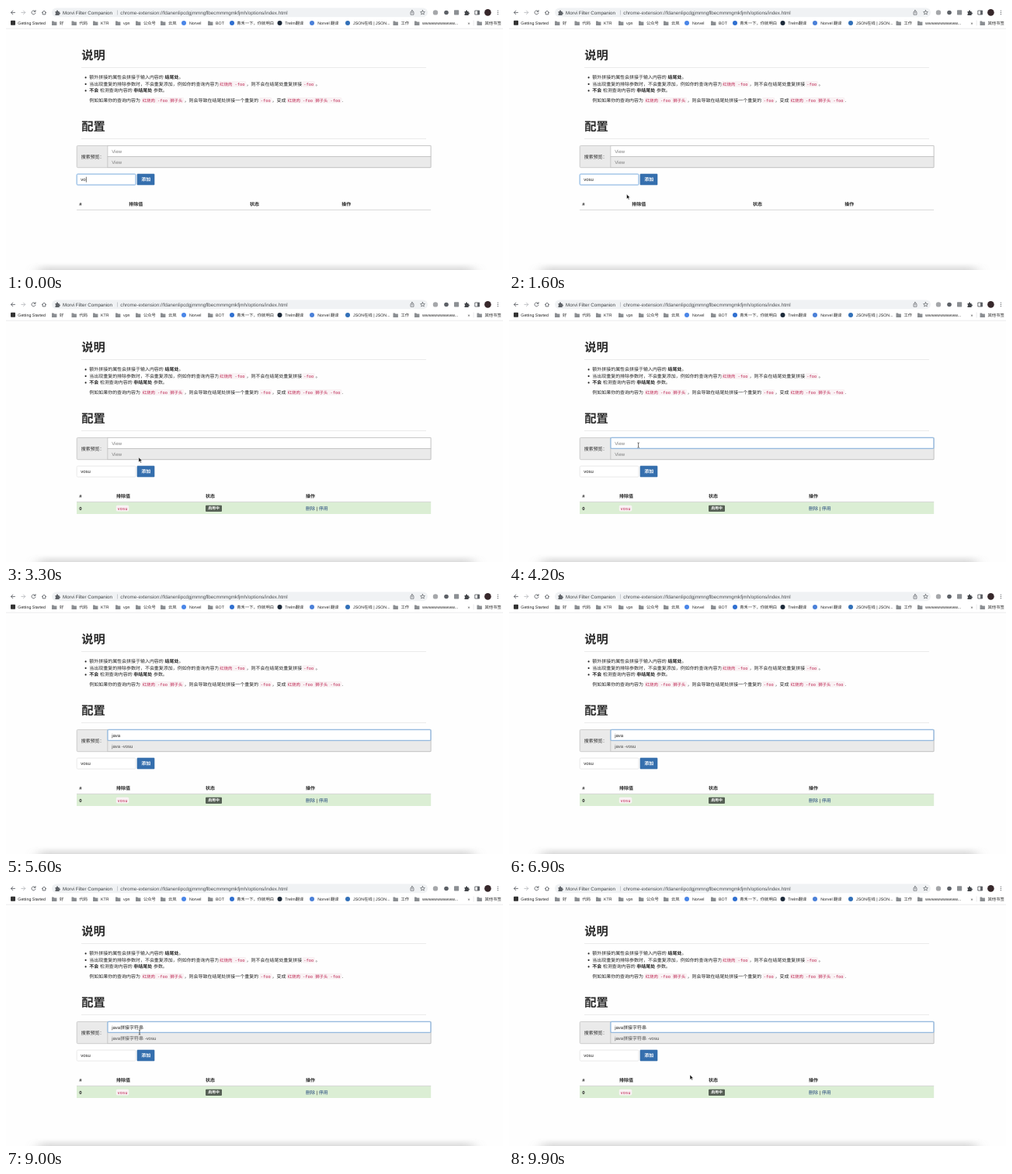
Recreate the animation shown at these times as an HTML page. Size 640 px wide and 341 px high, loop 10 s.

```html
<!DOCTYPE html>
<html lang="zh-CN">
<head>
<meta charset="utf-8">
<title>Options</title>
<style>
html, body { margin: 0; width: 100%; height: 100%; overflow: hidden; background: #fff; }
svg { display: block; width: 640px; height: 341px; }
text { font-family: "Liberation Sans", "Noto Sans CJK SC", "Noto Sans CJK", sans-serif; font-size: 5.97px; font-weight: 500; fill: #222; white-space: pre; text-rendering: geometricPrecision; }
.b { font-weight: 700; }
.h { font-size: 15.3px; font-weight: 700; fill: #2b2b2b; }
.code { font-family: "DejaVu Sans Mono", "Noto Sans CJK SC", monospace; font-size: 5.38px; fill: #bd2450; }
.mark { font-size: 5.3px; }
.url { font-size: 6.3px; fill: #4a4d51; }
.tag { font-size: 4.9px; font-weight: 700; fill: #fff; }
.link { fill: #24487c; }
.line { fill: none; stroke: #5f6368; stroke-width: .9; stroke-linecap: round; stroke-linejoin: round; }
</style>
</head>
<body>
<svg id="stage" viewBox="0 0 640 341"></svg>
<script>
const LOOP = 10000, STEP = 100;
const WORD = "vosu";
const stage = document.getElementById("stage");

// text with its vertical centre at cy
const text = (x, cy, s, cls = "", extra = "") =>
  `<text x="${x}" y="${cy + 2.1}" class="${cls}" ${extra}>${s}</text>`;
const rect = (x, y, w, h, fill, extra = "") =>
  `<rect x="${x}" y="${y}" width="${w}" height="${h}" fill="${fill}" ${extra}/>`;
const disc = (x, y, r, fill) => `<circle cx="${x}" cy="${y}" r="${r}" fill="${fill}"/>`;
const line = (d, extra = "") => `<path class="line" d="${d}" ${extra}/>`;
const bold = s => `<tspan class="b">${s}</tspan>`;
const code = (x, cy, w, s) =>
  rect(x, cy - 3.8, w, 7.6, "#f9f2f4", 'rx="1.6"') + text(x + 1.7, cy - .2, s, "code");
const folder = x =>
  `<path d="M${x} 19.4h2.3l.9 1h3.2v4.5h-6.4z" fill="#8b8e92"/>`;
const puzzle = (x, y, c) =>
  `<path d="M${x - 2.5} ${y - 1.7}h1.6a1 1 0 1 1 1.9 0h1.6v1.6a1 1 0 1 1 0 1.9v1.5h-5.1v-1.6a1 1 0 0 0 0-1.8z" fill="${c}"/>`;
const group = (id, s) => `<g id="${id}">${s}</g>`;

function toolbar() {
  let s = rect(0, 0, 640, 29, "#fff") + rect(59, 2.6, 484, 11.6, "#f0f2f4", 'rx="5.8"');
  s += line("M11.5 8.4H6.6M8.8 6.1L6.5 8.4L8.8 10.7");
  s += line("M19.8 8.4H24.7M22.5 6.1L24.8 8.4L22.5 10.7", 'style="stroke:#b9bcc0"');
  s += line("M37.6 7A2.5 2.5 0 1 0 37.9 9.2M38 5.6V7.3H36.2");
  s += line("M46.4 8.6L49 6.1L51.6 8.6M47.2 8.2V10.9H50.8V8.2");
  s += puzzle(66, 8.6, "#5f6368");
  s += text(73, 8.4, "Morvi Filter Companion", "url", 'style="font-size:6.2px;fill:#3c4043"');
  s += rect(143.3, 5.5, .5, 6, "#9aa0a6");
  s += text(147.3, 8.4, "chrome-extension://fdanenlipcdgjmmngflbecmmmgmkfjmh/options/index.html", "url");
  s += line("M521.8 7.6H521V11.2H525V7.6H524.2M523 9.2V5.4M521.9 6.4L523 5.3L524.1 6.4", 'style="stroke-width:.7"');
  s += line("M536.5 5.5L537.3 7.4L539.4 7.6L537.8 9L538.3 11L536.5 9.9L534.7 11L535.2 9L533.6 7.6L535.7 7.4Z", 'style="stroke-width:.7"');
  s += disc(553, 8.4, 3.2, "#a5a7aa") + disc(567, 8.5, 2.8, "#5c6066");
  s += rect(577, 5.3, 6.2, 6.2, "#8c9094", 'rx=".7"');
  s += puzzle(593, 8.6, "#44474b");
  s += line("M604.2 6H609.6V11H604.2Z") + rect(607, 6, 2.6, 5, "#5f6368");
  s += disc(620.4, 8.4, 4.3, "#37282b");
  for (const y of [6.1, 8.4, 10.7]) s += disc(633.4, y, .65, "#5f6368");
  return s;
}

function bookmarks() {
  let s = rect(6, 18.8, 6, 6, "#333", 'rx=".8"') + text(15.3, 21.9, "Getting Started", "mark");
  const dirs = [[59, "好"], [84.5, "代码"], [112, "KTR"], [141, "vpn"], [167, "公众号"],
    [199, "云岚"], [260, "BOT"], [498.5, "工作"], [526, "wwwwwwwwwww..."], [606.5, "其他书签"]];
  for (const [x, name] of dirs) s += folder(x) + text(x + 10, 21.9, name, "mark");
  const sites = [[229, "#4a86e8", "Norvel", 236], [291, "#2f6fd0", "青禾一下，你就明白", 297.3],
    [352.5, "#1d2a3a", "Trelm翻译", 359.3], [394, "#4a80d8", "Norvel 翻译", 401.3],
    [440, "#3270b8", "JSON在线 | JSON...", 447]];
  for (const [x, c, name, tx] of sites) s += disc(x, 21.9, 3, c) + text(tx, 21.9, name, "mark");
  s += text(594.5, 21.6, "»", "mark") + rect(601.8, 18.5, .5, 7, "#d5d7da");
  return s + rect(0, 28.8, 640, .6, "#dcdddf");
}

function page() {
  const edge = 'stroke="#bcbcbc" stroke-width=".7"';
  let s = text(97.2, 66.9, "说明", "h") + rect(97, 79.3, 444, .6, "#e0e0e0");
  for (const y of [92.4, 100.9, 109.4]) s += disc(102.6, y, 1.05, "#222");
  s += text(107.3, 92.2, "额外拼接的属性会拼接于输入内容的 " + bold("结尾处") + "。");
  s += text(107.3, 100.7, "当出现重复的排除参数时，不会重复添加，例如你的查询内容为");
  s += code(273.5, 100.9, 35.8, "红烧肉 -foo") + text(309.6, 100.7, "，则不会在结尾处重复拼接");
  s += code(381.5, 100.9, 16.4, "-foo") + text(398.5, 100.7, "。");
  s += text(107.3, 109.2, bold("不会") + " 检测查询内容的 " + bold("非结尾处") + " 参数。");
  s += text(107.3, 121.6, "例如如果你的查询内容为");
  s += code(174, 121.8, 55.2, "红烧肉 -foo 狮子头") + text(229.6, 121.6, "，则会导致在结尾处拼接一个重复的");
  s += code(326, 121.8, 16.4, "-foo") + text(342.6, 121.6, "，变成");
  s += code(361, 121.8, 71.4, "红烧肉 -foo 狮子头 -foo") + text(432.4, 121.6, ".");
  s += text(97.2, 159.2, "配置", "h") + rect(97, 171, 444, .6, "#e0e0e0");

  s += rect(91.2, 180.4, 455.8, 28.3, "#eaeaea", 'rx="1.4" ' + edge);
  s += text(96.7, 194.6, "搜索预览：");
  s += rect(130.9, 180.4, 416.1, 14, "#fff", edge);
  s += rect(130.9, 194.4, 416.1, 14.3, "#eaeaea", edge);
  s += rect(91.2, 217.1, 75.8, 14, "#fff", 'rx="1.4" stroke="#d9d9d9" stroke-width=".55"');
  s += rect(169, 217, 22, 14, "#356fae", 'id="button" rx=".5" stroke-width=".6"');
  return s + text(174.2, 224.2, "添加", "b", 'style="fill:#fff"');
}

const heads = xs => ["#", "排除值", "状态", "操作"].map((s, i) => text(xs[i], 255.4, s, "b")).join("");
const ring = (id, x, y, w, h) => group(id,
  rect(x, y, w, h, "none", 'rx="1.4" stroke="#8abdf0" stroke-width="1.9" opacity=".3"') +
  rect(x, y, w, h, "none", 'rx="1.4" stroke="#7fb2e4" stroke-width=".65"'));

function table() {
  const row = rect(91, 263.4, 456.2, 15.6, "#dbeed4") +
    text(94.2, 271.4, "0", "b") + code(141.8, 271.6, 16.5, WORD) +
    rect(257, 267.7, 21, 8.2, "#566055", 'rx="1"') + text(260.2, 271.3, "启用中", "tag") +
    text(386, 271.4, '<tspan class="link">删除</tspan> | <tspan class="link">停用</tspan>');
  return group("empty", heads([94.2, 158.2, 314, 432.3])) +
    group("filled", heads([94.2, 142, 257, 386]) + row) + rect(91, 262.9, 456.2, .8, "#d0d0d0");
}

const pointers =
  group("arrow", '<path d="M0 0V6.2L1.5 4.9L2.5 7.1L3.5 6.6L2.5 4.5H4.4Z" fill="#111" stroke="#fff" stroke-width=".5"/>') +
  group("beam", '<path d="M-1.2 -3.2Q0 -3.2 0 -2.4Q0 -3.2 1.2 -3.2M0 -2.5V2.5M-1.2 3.2Q0 3.2 0 2.4Q0 3.2 1.2 3.2" fill="none" stroke="#222" stroke-width=".65"/>') +
  group("hand", '<path d="M-.7 -3.4Q0 -4.2 .7 -3.4V-.8L3 -.1Q3.6 .2 3.4 1.4L2.8 4H-1L-2.9 1.1Q-2.9 .1 -1.9 .5L-.7 1.4Z" fill="#fff" stroke="#111" stroke-width=".6" stroke-linejoin="round"/>');

stage.innerHTML =
  `<defs><linearGradient id="fade" x1="0" y1="0" x2="0" y2="1">
    <stop offset="0" stop-color="#888" stop-opacity="0"/><stop offset="1" stop-color="#888" stop-opacity=".4"/>
  </linearGradient><filter id="soft" x="-10%" y="-50%" width="120%" height="200%"><feGaussianBlur stdDeviation="8 .8"/></filter></defs>` +
  rect(0, 0, 640, 341, "#fefefe") + toolbar() + bookmarks() + page() + table() +
  ring("wordRing", 91.2, 217.1, 75.8, 14) + ring("queryRing", 130.9, 180.4, 416.1, 14) +
  text(96.3, 224.2, "", "", 'id="word"') +
  text(136.2, 187.4, "", "", 'id="query"') + text(136.2, 201.6, "", "", 'id="result"') +
  rect(0, 0, .6, 7, "#111", 'id="caret"') +
  rect(42, 332, 560, 12, "url(#fade)", 'filter="url(#soft)"') + pointers;

const el = id => document.getElementById(id);
const show = (id, on) => { el(id).style.display = on ? "" : "none"; };

const wordKeys = [[-100, WORD.slice(0, 2)], [400, WORD.slice(0, 3)], [700, WORD]];
const queryKeys = [[3700, ""], [4700, "j"], [4800, "ja"], [4950, "jav"], [5050, "java"],
  [7200, "java拼接"], [8400, "java拼接字符串"]];
const path = [[1500, 150, 244], [2200, 177, 228], [2800, 177, 228], [3700, 166.5, 190],
  [9000, 172, 194], [9800, 233, 249]];

const latest = (keys, t) => keys.filter(k => k[0] <= t).pop() || [0, ""];

function pointerAt(t) {
  const i = path.findIndex(p => p[0] > t);
  if (i < 0) return path[path.length - 1].slice(1);
  const a = path[Math.max(i - 1, 0)], b = path[i];
  const u = Math.max(0, Math.min(1, (t - a[0]) / (b[0] - a[0] || 1)));
  const k = u * u * (3 - 2 * u);
  return [a[1] + (b[1] - a[1]) * k, a[2] + (b[2] - a[2]) * k];
}

function field(id, s, hint) {
  el(id).textContent = s || hint;
  el(id).style.fill = s ? (id === "result" ? "#4a4a4a" : "#222") : "#7c7c7c";
}

function draw(t) {
  const added = t >= 2400, searching = t >= 3700;
  const [wordTime, word] = latest(wordKeys, t), [queryTime, query] = latest(queryKeys, t);
  field("word", word, "");
  field("query", query, "View");
  field("result", query && query + " -" + WORD, "View");
  show("empty", !added);
  show("filled", added);
  show("wordRing", !added);
  show("queryRing", searching);

  const since = t - (searching ? queryTime : wordTime);
  const typed = el(searching ? "query" : "word");
  const width = searching && !query ? 0 : typed.getComputedTextLength();
  el("caret").setAttribute("x", (searching ? 136.2 : 96.3) + width + .3);
  el("caret").setAttribute("y", searching ? 184 : 220.7);
  show("caret", (searching || !added) && since % 1000 < 500);

  const [x, y] = pointerAt(t);
  const moving = t >= 1500 && t < 4700 || t >= 9000;
  const onButton = x > 169 && x < 191 && y > 217 && y < 231;
  const onField = x > 131 && y > 180 && y < 195;
  const kind = onButton ? "hand" : onField ? "beam" : "arrow";
  for (const id of ["hand", "beam", "arrow"]) {
    show(id, moving && id === kind);
    el(id).setAttribute("transform", `translate(${x} ${y})`);
  }
  const dark = moving && onButton;
  el("button").setAttribute("fill", dark ? "#2a5a8e" : "#356fae");
  el("button").setAttribute("stroke", dark ? "#16304e" : "#3069a6");
}

const start = performance.now();
function tick() {
  const t = (performance.now() - start) % LOOP;
  draw(Math.floor(t / STEP) * STEP);
  requestAnimationFrame(tick);
}
tick();
</script>
</body>
</html>
```
